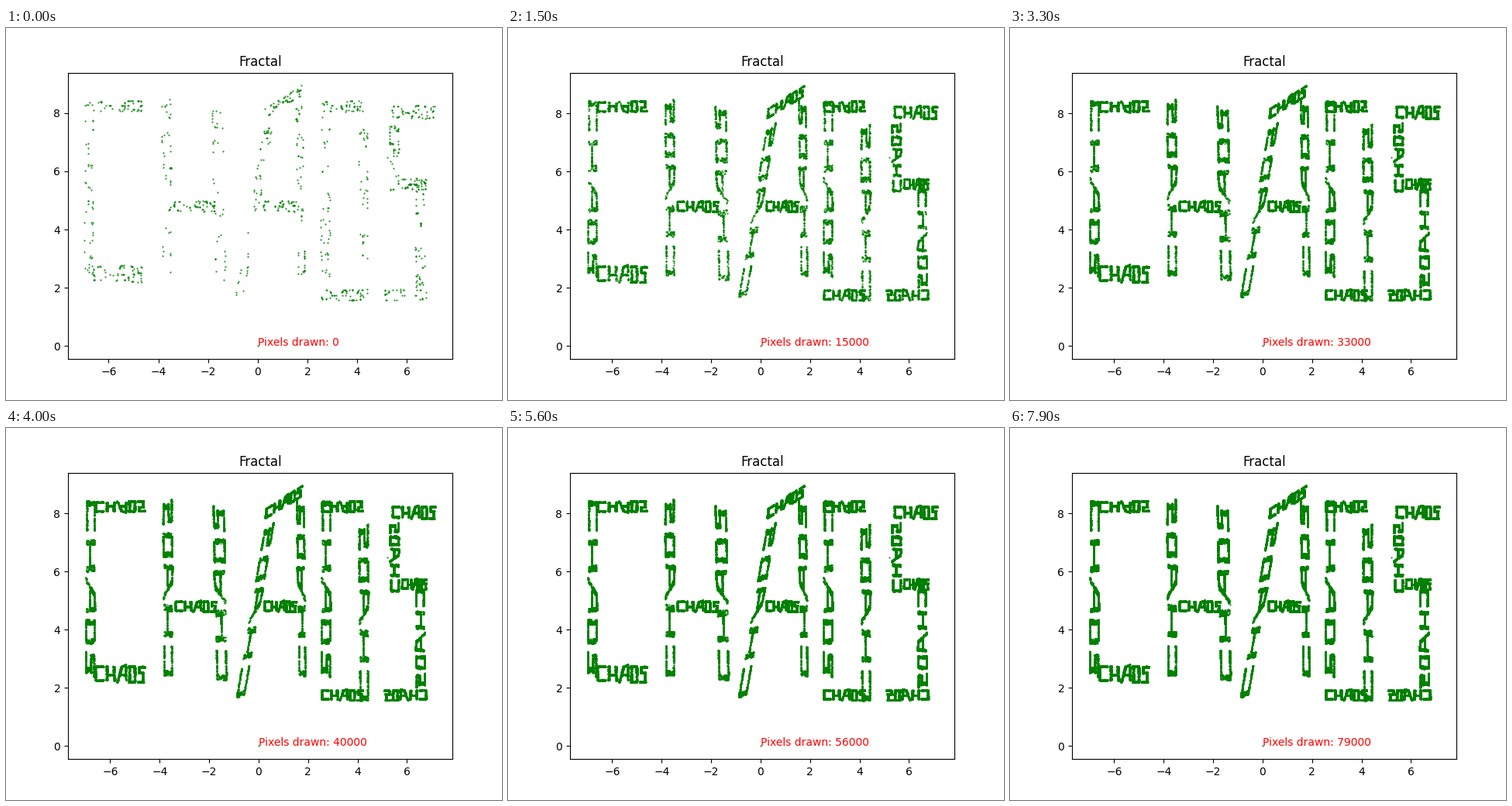
These frames come from a looping animation (640 by 480 pixels, 8000 ms). A matplotlib script:

```python
import random

import matplotlib.pyplot as plt
import numpy as np
from matplotlib.animation import FuncAnimation

FRAMES = 80
INTERVAL = 100
STEP = 1000
MARGIN = 0.05
THIN = 0.053


# Every stroke of the word is a shrunken copy of the whole word.
def beam(x, y, along, across):
    """Copy at (x, y): the word runs along one vector, its height across another."""
    return np.column_stack([along, across]), np.array([x, y])


def bar(x, y, length, height=THIN):
    return beam(x, y, (length, 0), (0, height))


def post(x, y, length, width=THIN):
    return beam(x, y, (0, length), (width, 0))


LETTER_C = [post(-7.083, 5.43, -0.429),
            bar(-5.619, 8.513, 0.143, -THIN),
            bar(-5.619, 2.057, 0.143, 0.083)]
LETTER_H = [post(-3.952, 5.43, 0.429),
            bar(-2.555, 4.536, 0.119),
            beam(-1.226, 5.235, (-0.012, 0.424), (-0.065, 0.002))]
LETTER_A = [beam(-0.421, 4.569, (0.085, 0.42), (0.051, 0.016)),
            beam(0.976, 8.113, (0.104, 0.057), (0.005, THIN)),
            beam(1.934, 5.37, (-0.008, 0.424), (-0.042, 0.004)),
            bar(0.861, 4.536, 0.093)]
LETTER_O = [post(2.447, 5.43, -0.429),
            bar(3.363, 8.513, 0.119, -THIN),
            bar(3.363, 1.487, 0.119),
            post(3.972, 4.569, 0.429)]
LETTER_S = [post(5.215, 6.483, 0.167),
            bar(6.26, 7.716, 0.124, 0.063),
            bar(6.279, 5.298, 0.071),
            post(6.805, 3.714, -0.238, -THIN),
            bar(5.941, 1.487, -0.121)]
WORD = LETTER_C + LETTER_H + LETTER_A + LETTER_O + LETTER_S


def chaos_game(count):
    rng = random.Random(7)
    points = np.zeros((count, 2))
    copy = LETTER_S[0]
    for k in range(1, count):
        matrix, shift = copy
        points[k] = matrix @ points[k - 1] + shift
        copy = rng.choice(WORD)
    return points


def padded(low, high):
    pad = MARGIN * (high - low)
    return low - pad, high + pad


points = chaos_game(FRAMES * STEP)

fig, ax = plt.subplots(figsize=(6.4, 4.8), dpi=100)
ax.set_title("Fractal")
dots, = ax.plot([], [], "g.", markersize=1)
label = ax.text(0, 0, "", color="red")


def update(i):
    dots.set_data(*points[:(i + 1) * STEP].T)
    # The view settles as the outermost points appear.
    missing = np.exp(-i)
    ax.set_xlim(*padded(-7 + 0.07 * missing, 7.13))
    ax.set_ylim(*padded(0, 8.953 - 0.013 * missing))
    label.set_text(f"Pixels drawn: {i * STEP}")
    return dots, label


anim = FuncAnimation(fig, update, frames=FRAMES, interval=INTERVAL,
                     repeat=True, repeat_delay=0)
plt.show()
```
